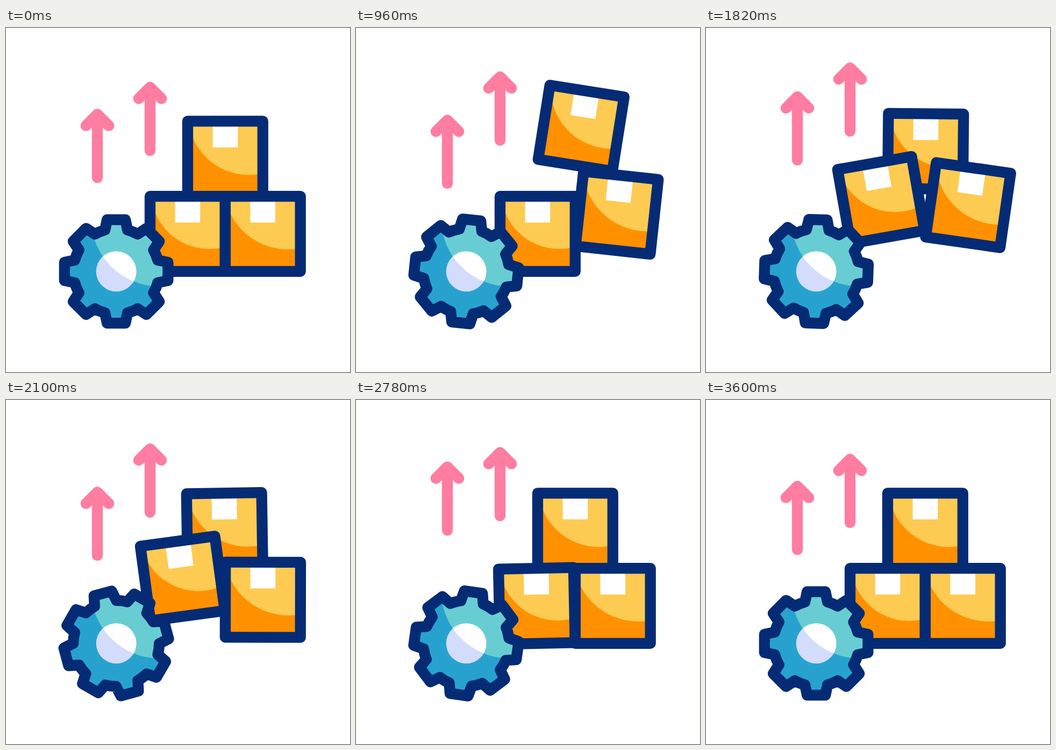
Write an HTML page that moves like this. It is 640 by 640 pixels and loops after 3620 ms.

```html
<!DOCTYPE html>
<html lang="en">
<head>
<meta charset="utf-8">
<title>Production growth</title>
<style>
html, body { margin: 0; width: 100%; height: 100%; overflow: hidden; background: #fff; }
svg { display: block; width: 100vw; height: 100vh; }
.line { fill: none; stroke: #052b75; stroke-width: 20.3; stroke-linejoin: round; }
.arrow { fill: none; stroke: #ff7da1; stroke-width: 20.3; stroke-linecap: round; stroke-linejoin: round; }
</style>
</head>
<body>
<svg viewBox="0 0 640 640">
  <defs>
    <clipPath id="boxClip"><rect x="-69.9" y="-139.8" width="139.8" height="139.8"/></clipPath>
    <clipPath id="gearClip"><path class="gear"/></clipPath>
    <clipPath id="hubClip"><circle cx="205.1" cy="452.9" r="37.4"/></clipPath>
  </defs>
  <g id="boxes"></g>
  <g clip-path="url(#gearClip)">
    <rect x="90" y="340" width="230" height="230" fill="#27a2cf"/>
    <circle cx="285" cy="354" r="126.7" fill="#68cdd2"/>
  </g>
  <g clip-path="url(#hubClip)">
    <rect x="160" y="410" width="90" height="90" fill="#d3dcfb"/>
    <circle cx="285" cy="354" r="126.7" fill="#fff"/>
  </g>
  <path class="gear line"/>
  <path class="arrow" d="M170 278.2V160.5M148.8 181.7L170 160.5L191.2 181.7"/>
  <path class="arrow" d="M268 228V110.2M246.8 131.4L268 110.2L289.2 131.4"/>
</svg>
<script>
const LOOP = 3620, STEP = 20;
const LIFT = -64, TILT = 10;
const all = s => [...document.querySelectorAll(s)];

// Boxes pivot on the middle of their base; times are in 20 ms steps.
const boxes = [
  { x: 407.9, y: 313.1, dir: 1, arc: [44, -153, 113.3], rise: [28.5, 53], fall: 70.2 },
  { x: 337.9, y: 452.9, dir: -1, arc: [40, -150.4, 108.5], rise: [51.5, 78], fall: 96.3 },
  { x: 477.8, y: 452.9, dir: 1, arc: [47, -161, 120], rise: [33, 59], fall: 83.3 }
];

document.getElementById('boxes').innerHTML = boxes.map(({ arc: [cx, cy, r] }) => `
  <g class="box">
    <g clip-path="url(#boxClip)">
      <rect x="-70" y="-140" width="140" height="140" fill="#ff9100"/>
      <circle cx="${cx}" cy="${cy}" r="${r}" fill="#fdcb52"/>
      <rect x="-23.3" y="-139" width="46.6" height="48" fill="#fff"/>
    </g>
    <rect class="line" x="-69.9" y="-139.8" width="139.8" height="139.8"/>
  </g>`).join('');

function gearPath() {
  let d = '';
  for (let i = 0; i < 8; i++) {
    const a = i * Math.PI / 4, c = Math.cos(a), s = Math.sin(a);
    const at = (x, y) => `${(x * c - y * s).toFixed(2)} ${(x * s + y * c).toFixed(2)}`;
    d += (i ? 'A80 80 0 0 1 ' : 'M') + at(-21, -77.2);
    d += 'L' + at(-17, -96.3) + 'L' + at(17, -96.3) + 'L' + at(21, -77.2);
  }
  return d + 'A80 80 0 0 1 -21 -77.2Z';
}

// Piecewise tween through [time, value] pairs with sine in-out easing.
function tween(t, keys) {
  if (t <= keys[0][0]) return keys[0][1];
  for (let i = 1; i < keys.length; i++) {
    const [t0, v0] = keys[i - 1], [t1, v1] = keys[i];
    if (t < t1) return v0 + (v1 - v0) * (1 - Math.cos(Math.PI * (t - t0) / (t1 - t0))) / 2;
  }
  return keys[keys.length - 1][1];
}

const bob = [0, -38.3, 25.4, -38.3, 25.4, -38.3, 0].map((v, i) => [i * 28.5, v]);
const boxEls = all('.box'), gearEls = all('.gear'), arrowEls = all('.arrow');
gearEls.forEach(el => el.setAttribute('d', gearPath()));

function draw(ms) {
  const t = Math.floor((ms % LOOP) / STEP);
  gearEls.forEach(el => el.setAttribute('transform', `translate(205.1 452.9) rotate(${t * 2})`));
  arrowEls.forEach((el, i) => el.setAttribute('transform', `translate(0 ${tween(t - i * 9, bob)})`));
  boxes.forEach(({ x, y, dir, rise: [start, peak], fall }, i) => {
    const land = fall + 30;
    const lift = tween(t, [[start, 0], [peak, LIFT], [fall, LIFT], [land, 0]]);
    const tilt = tween(t, [[start, 0], [peak, TILT], [fall, TILT],
      [land, -2], [land + 12, 1.2], [land + 24, 0]]);
    boxEls[i].setAttribute('transform', `translate(${x} ${y + lift}) rotate(${dir * tilt})`);
  });
}

const begin = performance.now();
function loop() {
  draw(performance.now() - begin);
  requestAnimationFrame(loop);
}
loop();
</script>
</body>
</html>
```
